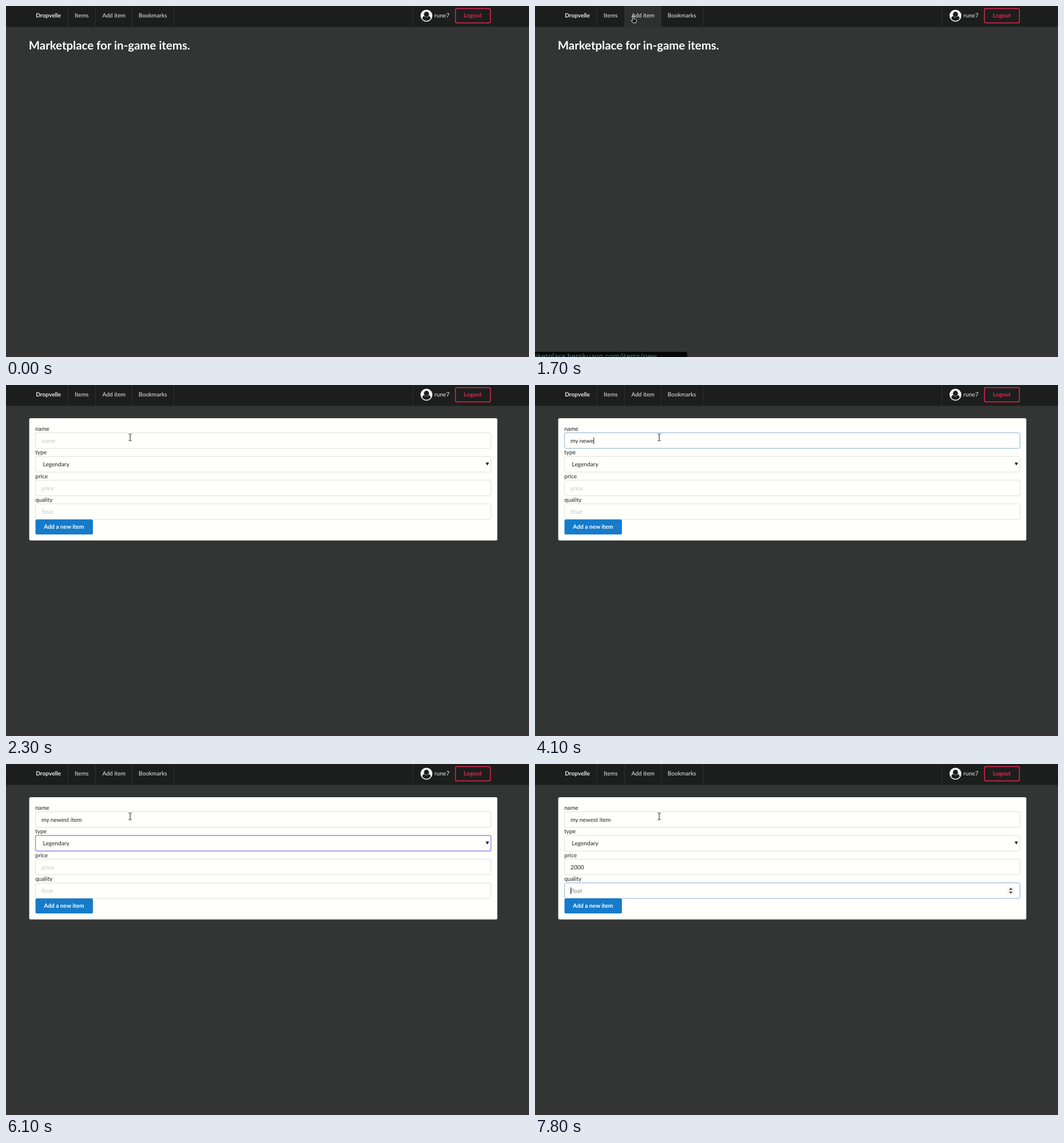
Write an HTML page that moves like this. It is 914 px wide and 613 px high and loops after 8000 ms.

```html
<!DOCTYPE html>
<html lang="en">
<head>
<meta charset="utf-8">
<title>Item marketplace</title>
<style>
  html, body { margin: 0; width: 100%; height: 100%; overflow: hidden; background: #333534; }
  svg { display: block; width: 100%; height: 100%; }
  text { font: 10.16px Lato, sans-serif; white-space: pre; text-rendering: geometricPrecision; }
  .bold { font-weight: 700; }
  .nav text { fill: #e8e8e8; }
  .nav .logout { fill: #e0284f; }
  .title { font-size: 20.4px; font-weight: 700; fill: #fff; }
  .form text { fill: #222321; }
  .form .hint { fill: #c7c7c5; }
  .form .focus .hint { fill: #858584; }
  .form .submit { fill: #fff; }
  .box { fill: #fffffc; stroke: #dededb; }
  .focus .box { stroke: #8bb0d6; }
  .focus .select { stroke: #8c8ce8; stroke-width: 1.4; }
  .spin { display: none; }
  .focus .spin { display: inline; }
  .status text { font: 12.4px "Open Sans", sans-serif; fill: #4d8790; }
</style>
</head>
<body>
<svg viewBox="0 0 914 613" preserveAspectRatio="none">
  <rect width="914" height="613" fill="#333534"/>
  <rect y="607" width="914" height="6" fill="#383333"/>

  <g class="nav">
    <rect width="914" height="36.5" fill="#1c1e1d"/>
    <rect id="hover" x="157" width="63.5" height="36.5" fill="#fff" opacity="0"/>
    <path d="M108.5 0V36.5M156.5 0V36.5M220.5 0V36.5M293.5 0V36.5M711.5 0V36.5" stroke="#2f3130"/>
    <text class="bold" x="52.2" y="20.3">Dropvelle</text>
    <text x="120" y="20.3">Items</text>
    <text x="168.4" y="20.3">Add item</text>
    <text x="231.7" y="20.3">Bookmarks</text>
    <g transform="translate(724.4 6.4) scale(.0116)">
      <circle cx="896" cy="896" r="896" fill="#f2f2f2"/>
      <g fill="#1c1e1d">
        <circle cx="896" cy="704" r="384"/>
        <path d="M1523 1339q-22-155-87.5-257.5t-184.5-118.5q-67 74-159.5 115.5t-195.5 41.5-195.5-41.5-159.5-115.5q-119 16-184.5 118.5t-87.5 257.5q106 150 271 237.5t356 87.5 356-87.5 271-237.5z"/>
      </g>
    </g>
    <text x="748.8" y="19.8">rune7</text>
    <rect x="785.5" y="4.5" width="61" height="25" rx="2.5" fill="none" stroke="#e0284f" stroke-width="1.5"/>
    <text class="bold logout" x="815.8" y="20.3" text-anchor="middle">Logout</text>
  </g>

  <text id="title" class="title" x="39.8" y="76">Marketplace for in-game items.</text>

  <g id="form" class="form">
    <rect x="40.6" y="58" width="818" height="213.5" rx="2.5" fill="#fffffc"/>
    <g id="fields"></g>
    <path d="M838.2 135.6h6l-3 5z" fill="#111"/>
    <rect x="51.5" y="234.7" width="100.4" height="26.4" rx="2.7" fill="#157bca"/>
    <text class="bold submit" x="101.4" y="251.4" text-anchor="middle">Add a new item</text>
  </g>

  <g id="status" class="status">
    <path d="M0 604H263Q266 604 266 607V613H0z" fill="#060707"/>
    <text x="0" y="615.6">rketplace.herokuapp.com/items/new</text>
  </g>

  <g id="beam" fill="none">
    <path d="M-2.5-6Q0-6 0-5Q0-6 2.5-6M0-5V5M-2.5 6Q0 6 0 5Q0 6 2.5 6" stroke="#fff" stroke-width="2" opacity=".6"/>
    <path d="M-2.5-6Q0-6 0-5Q0-6 2.5-6M0-5V5M-2.5 6Q0 6 0 5Q0 6 2.5 6" stroke="#111"/>
  </g>
  <path id="arrow" d="M0 0V11.3L2.6 8.9L4.4 12.9L6.1 12.2L4.4 8.2H8z" fill="#111" stroke="#fff" stroke-width=".7"/>
  <path id="hand" d="M-1.2-4.5Q0-5.6 .9-4.5V-.6L4.6 .2Q5.6 .6 5.5 1.8L4.6 6.4H-1L-3.7 2.6Q-4 1.2-2.8 1.4L-1.2 2.6z" fill="#111" stroke="#eee" stroke-width=".9"/>
</svg>

<script>
const LOOP = 8000, STEP = 100;
const $ = id => document.getElementById(id);
const show = (el, on) => { el.style.display = on ? "" : "none"; };

// Last entry whose start time has been reached
const at = (track, t) => track.reduce((v, [start, next]) => t >= start ? next : v, null);

const specs = [
  { label: "name", hint: "name" },
  { label: "type", fixed: "Legendary" },
  { label: "price", hint: "price", number: true },
  { label: "quality", hint: "float", number: true }
];

const fields = specs.map((spec, i) => {
  const y = 83.4 + i * 41.4;
  const g = document.createElementNS("http://www.w3.org/2000/svg", "g");
  const mid = y + 13.7;
  const spinner = `<g class="spin"><rect x="826" y="${mid - 6}" width="11" height="12" fill="#efefec"/>
    <path d="M828.6 ${mid - 1.6}h5.8l-2.9-3.4zM828.6 ${mid + 1.6}h5.8l-2.9 3.4z" fill="#333"/></g>`;
  g.innerHTML = `<text x="51.2" y="${y - 3.4}">${spec.label}</text>
    <rect class="box ${spec.fixed ? "select" : ""}" x="51.5" y="${y}" width="796" height="27.2" rx="2.7"/>
    <text class="hint" x="62" y="${y + 17.5}">${spec.hint || ""}</text>
    <text class="value" x="${spec.fixed ? 64.6 : 62}" y="${y + 17.5}">${spec.fixed || ""}</text>
    ${spec.number ? spinner : ""}
    <rect class="caret" x="62" y="${y + 7.8}" width="1" height="12" fill="#222"/>`;
  $("fields").append(g);
  const part = name => g.querySelector("." + name);
  return { g, spec, hint: part("hint"), value: part("value"), caret: part("caret") };
});

const typed = [
  [[0, ""], [3100, "m"], [3200, "my"], [3500, "my "], [3600, "my n"], [3700, "my ne"],
   [4100, "my newe"], [4700, "my newest"], [5500, "my newest i"], [5600, "my newest it"],
   [5700, "my newest ite"], [5800, "my newest item"]],
  null,
  [[0, ""], [7000, "2"], [7100, "20"], [7200, "2000"]],
  [[0, ""]]
];
const focus = [[0, -1], [2500, 0], [6100, 1], [6300, 2], [7600, 3]];
const caretOn = [[0, true], [3000, false], [3100, true], [6800, false], [7000, true]];

function drawField(f, i, t) {
  const active = at(focus, t) === i;
  f.g.classList.toggle("focus", active);
  show(f.caret, active && !f.spec.fixed && at(caretOn, t));
  if (f.spec.fixed) return;
  const text = at(typed[i], t);
  f.value.textContent = text;
  show(f.hint, !text);
  const width = text ? f.value.getComputedTextLength() : 0;
  f.caret.setAttribute("x", 62.2 + width);
}

function pointer(t) {
  if (t < 400) return null;
  if (t < 1800) {
    const p = Math.min(1, Math.max(0, (t - 500) / 800));
    const e = p * p * (3 - 2 * p);
    const x = 111 + 61 * e, y = 76.5 - 53.5 * e;
    return { x, y, kind: y > 58 ? "beam" : y > 36 ? "arrow" : "hand" };
  }
  if (t < 2300) {
    const p = Math.min(1, (t - 1800) / 300);
    return { x: 213 + p, y: 82 + 2 * p, kind: "arrow" };
  }
  return { x: 217, y: 91.5, kind: "beam" };
}

function statusOpacity(t) {
  const fadeIn = (t - 1400) / 300, fadeOut = (2100 - t) / 200;
  return Math.max(0, Math.min(1, fadeIn, fadeOut));
}

function draw(now) {
  const t = Math.floor(now % LOOP / STEP) * STEP;
  const onForm = t >= 1800;
  show($("title"), !onForm);
  show($("form"), onForm);
  fields.forEach((f, i) => drawField(f, i, t));

  const p = pointer(t);
  for (const kind of ["beam", "arrow", "hand"]) {
    const on = p !== null && p.kind === kind;
    show($(kind), on);
    if (on) $(kind).setAttribute("transform", `translate(${p.x} ${p.y})`);
  }
  $("hover").setAttribute("opacity", p && p.kind === "hand" ? .08 : 0);
  $("status").setAttribute("opacity", statusOpacity(t));
}

function tick() {
  draw(performance.now());
  requestAnimationFrame(tick);
}
tick();
</script>
</body>
</html>
```
